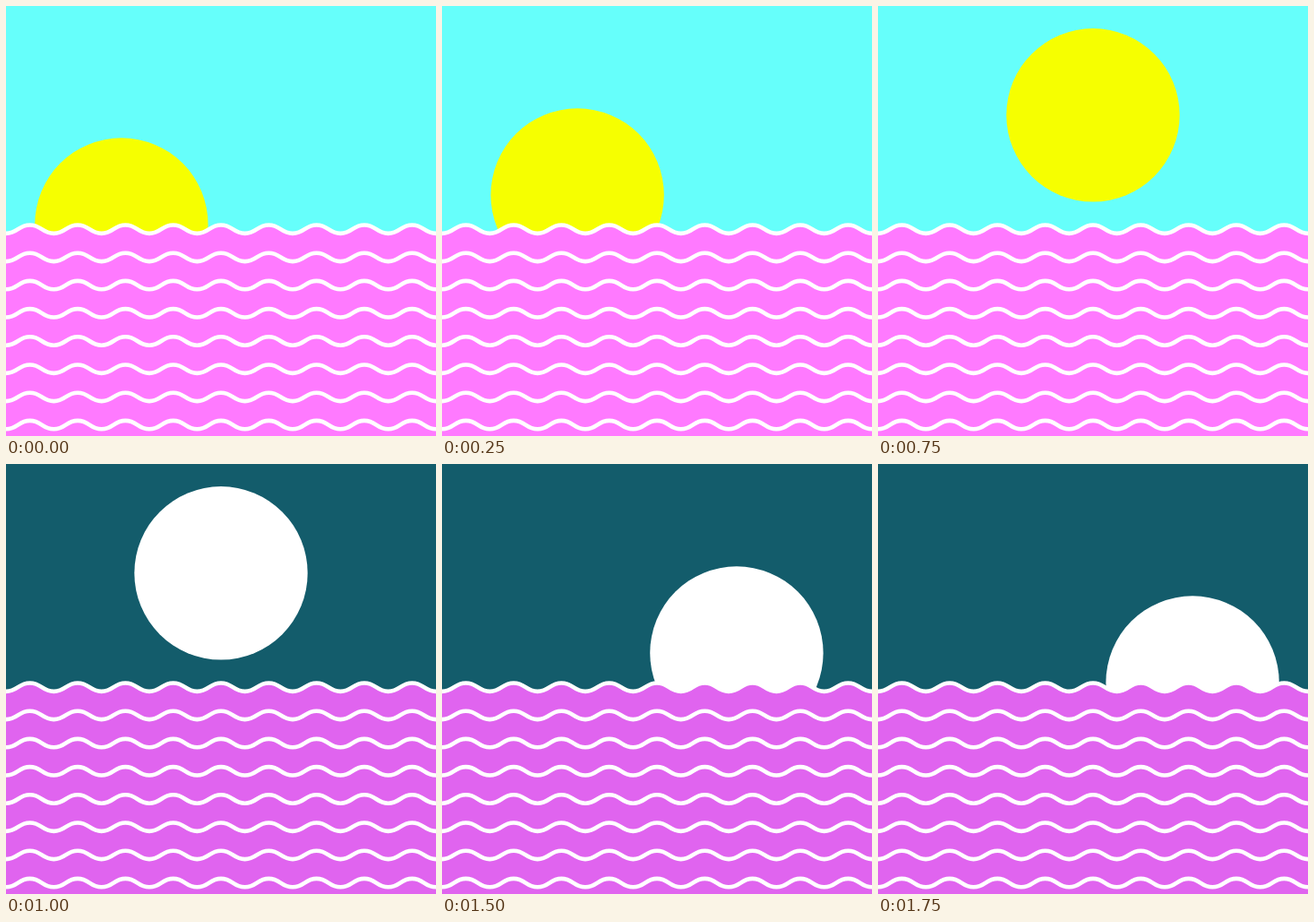
Recreate the animation shown at these times as an HTML page. Size 480 by 480 pixels, loop 2 s.

```html
<!DOCTYPE html>
<html lang="en">
<head>
<meta charset="utf-8">
<title>Day and night over the sea</title>
<style>
html, body { margin: 0; width: 100%; height: 100%; overflow: hidden; }
svg { display: block; width: 100%; height: 100%; background: var(--sky); }
svg, .day { --sky: #66fffb; --orb: #f6ff00; --sea: #ff7aff; }
.night { --sky: #135c6b; --orb: #fff; --sea: #e064ef; }
#orb { fill: var(--orb); }
#sea { fill: var(--sea); }
#waves { fill: none; stroke: #fff; stroke-width: 4.6; }
</style>
</head>
<body>
<svg id="scene" class="day" viewBox="0 0 480 480">
  <circle id="orb" r="96.7"/>
  <path id="sea"/>
  <path id="waves"/>
</svg>
<script>
const get = id => document.getElementById(id);
const scene = get('scene'), orb = get('orb');
const STEP = 250, HALF = 80 / 3, HEIGHT = 9.4, GAP = 31.2;

// One row of waves from the left edge, starting in a trough.
function wave(y) {
  let d = `M0 ${y}`;
  for (let i = 0; i < 18; i++) {
    const dy = i % 2 ? HEIGHT : -HEIGHT;
    d += `c${HALF / 2} 0 ${HALF / 2} ${dy} ${HALF} ${dy}`;
  }
  return d;
}

const top0 = 253.9;
get('sea').setAttribute('d', wave(top0) + 'V480H0Z');
get('waves').setAttribute('d',
  Array.from({ length: 8 }, (_, i) => wave(top0 + i * GAP)).join(''));

// Distance from the middle and height, from noon outwards.
const stops = [[0, 121.8], [66.7, 166.2], [88.9, 211], [111.1, 244]];

function draw(now) {
  const k = Math.floor(now / STEP) % 8;
  const night = k > 3;
  const [dx, y] = stops[night ? k - 4 : 3 - k];
  orb.setAttribute('cx', 240 + (night ? dx : -dx));
  orb.setAttribute('cy', y);
  scene.setAttribute('class', night ? 'night' : 'day');
}

const start = performance.now();
function tick() {
  draw(performance.now() - start);
  requestAnimationFrame(tick);
}
tick();
</script>
</body>
</html>
```
